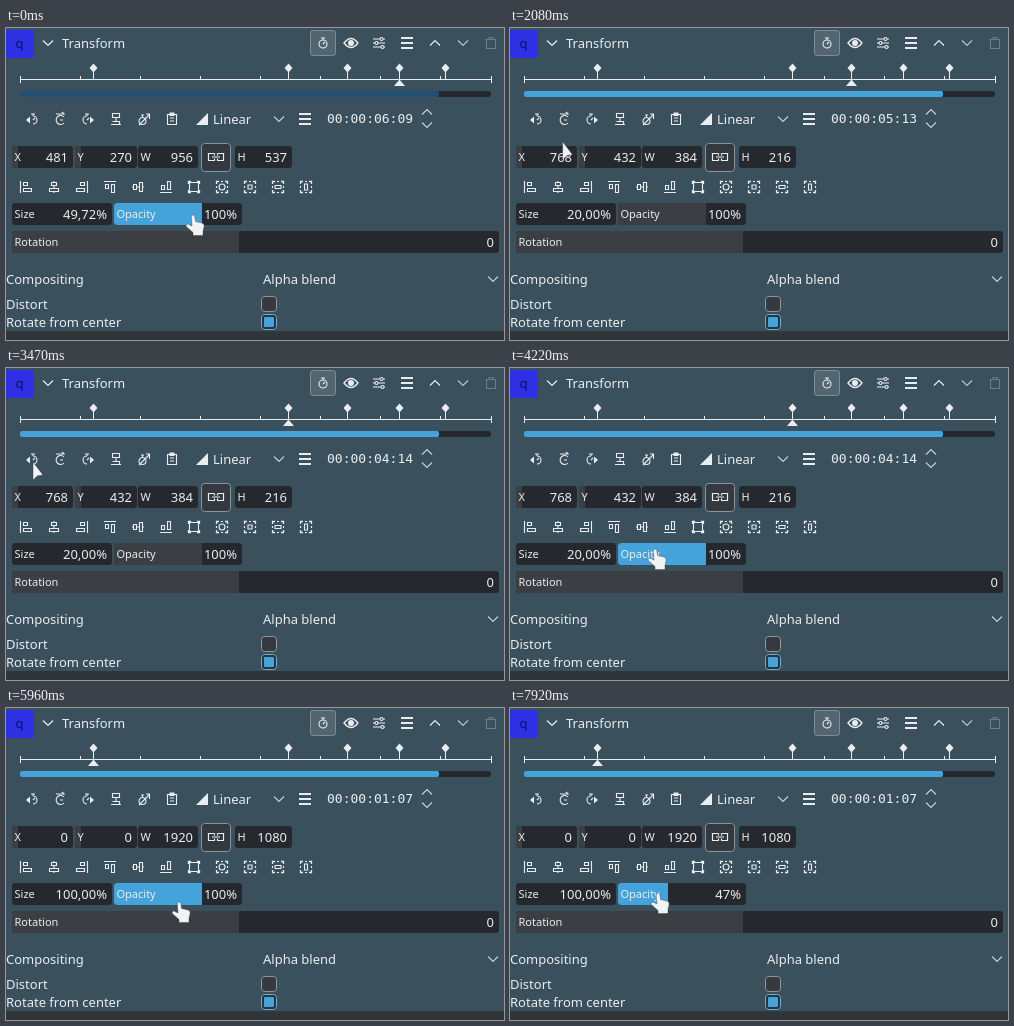
Animation, 498 px wide and 312 px high, one loop 7.99 s. Source, as an HTML page with a canvas:

```html
<!DOCTYPE html>
<html lang="en">
<head>
<meta charset="utf-8">
<title>Transform effect panel</title>
<style>
html, body { margin: 0; width: 100%; height: 100%; overflow: hidden; background: #3a505c; }
canvas { display: block; }
</style>
</head>
<body>
<canvas id="stage" width="498" height="312"></canvas>
<script>
const ctx = document.getElementById('stage').getContext('2d');
const LOOP = 7990;
const INK = '#e9edef', BLUE = '#43a3da', FIELD = '#25292d', FILL = '#3b3e42', PANEL = '#3a505c';
const SANS = '"Noto Sans", sans-serif', MONO = '"DejaVu Sans Mono", monospace';

const STATES = [
  { from: 0, x: 393, time: '00:00:06:09', values: ['481', '270', '956', '537', '49,72%'] },
  { from: 1800, x: 341, time: '00:00:05:13', values: ['768', '432', '384', '216', '20,00%'] },
  { from: 3330, x: 282, time: '00:00:04:14', values: ['768', '432', '384', '216', '20,00%'] },
  { from: 5060, x: 87, time: '00:00:01:07', values: ['0', '0', '1920', '1080', '100,00%'] }
];
const DRAG_START = 6970, PRESS_TIME = 140;

// Pointer path: time, x, y
const PATH = [
  [0, 187, 187], [130, 187, 187], [500, 178, 189], [890, 170, 186], [1100, 170, 186],
  [1380, 60, 100], [1590, 27, 94], [1940, 27, 94], [2250, 100, 150], [2640, 146, 184],
  [2770, 146, 184], [2910, 112, 168], [3190, 27, 94], [3470, 27, 94], [3960, 145, 181],
  [4220, 145, 181], [4780, 29, 95], [4920, 27, 94], [5130, 27, 94], [5540, 130, 172],
  [5820, 180, 193], [5960, 173, 194], [6310, 187, 188], [6970, 187, 188],
  [7380, 137, 186], [7720, 146, 185], [7850, 146, 185], [7920, 148, 185], [7990, 148, 185]
];

const clamp = (v, lo, hi) => Math.min(hi, Math.max(lo, v));

function slope(i, axis) {
  const a = PATH[i - 1], p = PATH[i], b = PATH[i + 1];
  const resting = q => !q || (q[1] === p[1] && q[2] === p[2]);
  return resting(a) || resting(b) ? 0 : (b[axis] - a[axis]) / (b[0] - a[0]);
}

function pointerAt(t) {
  let i = 0;
  while (i < PATH.length - 2 && t >= PATH[i + 1][0]) i++;
  const a = PATH[i], b = PATH[i + 1], span = b[0] - a[0];
  const u = (t - a[0]) / span, v = 1 - u;
  const along = k => v * v * (1 + 2 * u) * a[k] + u * u * (3 - 2 * u) * b[k]
    + span * u * v * (v * slope(i, k) - u * slope(i + 1, k));
  return { x: along(1), y: along(2) };
}

function text(s, x, y, size = 13, align = 'left', color = INK, family = SANS) {
  ctx.font = `${size}px ${family}`;
  ctx.textAlign = align;
  ctx.fillStyle = color;
  ctx.fillText(s, x, y);
}

function box(x, y, w, h, color, r = 0, border) {
  ctx.beginPath();
  ctx.roundRect(x, y, w, h, r);
  ctx.fillStyle = color;
  ctx.fill();
  if (border) {
    ctx.beginPath();
    ctx.roundRect(x + .5, y + .5, w - 1, h - 1, r);
    ctx.strokeStyle = border;
    ctx.lineWidth = 1;
    ctx.stroke();
  }
}

function shape(d, x, y, { fill, stroke, width = 1 }) {
  const path = new Path2D(d);
  ctx.save();
  ctx.translate(x, y);
  if (fill) { ctx.fillStyle = fill; ctx.fill(path); }
  if (stroke) { ctx.strokeStyle = stroke; ctx.lineWidth = width; ctx.stroke(path); }
  ctx.restore();
}

const line = (d, x, y, color = INK, width = 1.1) => shape(d, x, y, { stroke: color, width });
const solid = (d, x, y, color = INK) => shape(d, x, y, { fill: color });

const WATCH = 'M4 1A4 4 0 1 1-4 1A4 4 0 1 1 4 1M-2-5H2M0-5V-3M0 1L2-1';
const MENU = 'M-6-5H6M-6 0H6M-6 5H6';
const DOWN = 'M-5-2.5L0 2.5L5-2.5', UP = 'M-5 2.5L0-2.5L5 2.5';
const FRAME = 'M-4.5-4.5H4.5V4.5H-4.5Z';
const CORNERS = 'M-5.5-3V-5.5H-3M3-5.5H5.5V-3M5.5 3V5.5H3M-3 5.5H-5.5V3';

function field(label, x, y, w, value, fillTo, fillColor = FILL) {
  box(x, y, w, 22, FIELD, 3);
  if (fillTo > x) box(x, y, fillTo - x, 22, fillColor, [3, 0, 0, 3]);
  text(label, x + 2.5, y + 15, 11);
  text(value, x + w - 5, y + 16, 13, 'right');
}

function header() {
  box(0, 2, 28, 28, '#2e30e6');
  text('q', 13.5, 20, 13, 'center', '#11114e');
  line(DOWN, 42, 15, INK, 1.2);
  text('Transform', 56, 20);
  box(304, 2, 26, 26, '#53656f', 3, '#7e8b92');
  line(WATCH, 317, 15);
  line('M-7 0Q0-9 7 0Q0 9-7 0Z', 345, 15, INK, 1.3);
  solid('M3 0A3 3 0 1 1-3 0A3 3 0 1 1 3 0', 345, 15);
  line('M-6-4H1M4-4H6M-6 0H-4M-1 0H6M-6 4H2M5 4H6', 373, 15);
  line('M1-4a1.5 1.5 0 1 0 3 0a1.5 1.5 0 1 0-3 0M-4 0a1.5 1.5 0 1 0 3 0a1.5 1.5 0 1 0-3 0M2 4a1.5 1.5 0 1 0 3 0a1.5 1.5 0 1 0-3 0', 373, 15);
  line(MENU, 401, 15, INK, 2);
  line(UP, 429, 15, INK, 1.2);
  line(DOWN, 457, 15, '#b9c3c8', 1.2);
  line('M-5.5-3.5H5.5M-2-3.5V-5.5H2V-3.5M-4.5-3.5V5.5H4.5V-3.5', 485, 15, '#6d7d86');
}

function timeline(current, lit) {
  line('M14 51.5H486M14.5 48V55M485.5 48V55', 0, 0, INK, 1);
  for (let i = 1; i < 8; i++) line('M.5-3V1', Math.round(13.5 + i * 60.1), 51, INK, 1);
  for (const x of [87, 282, 341, 393, 439]) {
    line('M.5-9V1', x, 51, INK, 1);
    solid('M0-4.5L4 0L0 4.5L-4 0Z', x + .5, 40);
  }
  solid('M0 0L5.5 6.5H-5.5Z', current + .5, 51.5);
  box(14, 63, 471, 6, FIELD, 2);
  box(14, 63, 419, 6, '#235072', 2);
  if (lit > 0) {
    ctx.globalAlpha = lit;
    box(14, 63, 419, 6, BLUE, 2);
    ctx.globalAlpha = 1;
  }
}

function toolbar(time, pressed) {
  const y = 91;
  if (pressed) box(13, 78, 26, 26, BLUE, 3);
  const half = 'M1-3A4 4 0 1 1 1 5M1-5V-3M-1-5H3M1 1L3-1';
  line(half, 26, y);
  solid('M-2-2.5V4.5L-6 1Z', 26, y);
  line('M4-2A4.5 4.5 0 1 0 4 4M-4-5H4L2-7M0 1H3', 54, y);
  line('M-1-3A4 4 0 1 0-1 5M-1-5V-3M-3-5H1M-1 1L1-1', 82, y);
  solid('M2-2.5V4.5L6 1Z', 82, y);
  line('M-3.5-5.5H3.5V-1.5H-3.5ZM0-1.5V2M-5 5.5H5M-3.5 2.5H3.5V5.5', 110, y);
  line('M2 2A3.5 3.5 0 1 1-5 2A3.5 3.5 0 1 1 2 2M-3-4H0M-1.5-4V-2M-5 6L5-4M2-5H5.5V0', 138, y);
  line('M-4.5-4.5H4.5V5.5H-4.5ZM-2-1H2M-2 2H2', 166, y);
  solid('M-2.5-6.5H2.5V-3H-2.5Z', 166, y);
  solid('M-6 6H6V-6Z', 196, y);
  text('Linear', 207, 96);
  line(DOWN, 273, y, '#c9d1d5');
  line(MENU, 299, y, INK, 2);
  text(time, 321, 95, 13, 'left', INK, MONO);
  line(UP, 421, 84, '#c9d1d5');
  line(DOWN, 421, 97, '#c9d1d5');
}

function geometry(values) {
  field('X', 6, 118, 61, values[0], 12);
  field('Y', 69, 118, 62, values[1], 75);
  field('W', 132, 118, 60, values[2]);
  field('H', 229, 118, 57, values[3]);
  box(195, 115, 30, 29, '#33393e', 3, '#8c979d');
  line('M-1.5-3.5H-7.5V3.5H-1.5V1.5M-1.5-3.5V-1.5M1.5-3.5H7.5V3.5H1.5V1.5M1.5-3.5V-1.5M-4 0H4', 210, 129, INK, 1.2);
}

function alignRow() {
  const edge = 'M-5.5-6V6M-2.5-4.5H1.5V-1.5H-2.5ZM-2.5 1.5H5.5V4.5H-2.5Z';
  const middle = 'M0-6V-4.5M0-1.5V1.5M0 4.5V6M-2.5-4.5H2.5V-1.5H-2.5ZM-4.5 1.5H4.5V4.5H-4.5Z';
  const turned = [[edge, 1, 0, 0, 1], [middle, 1, 0, 0, 1], [edge, -1, 0, 0, 1],
    [edge, 0, 1, 1, 0], [middle, 0, 1, 1, 0], [edge, 0, -1, 1, 0]];
  turned.forEach(([d, a, b, c, e], i) => {
    ctx.save();
    ctx.transform(a, b, c, e, 20 + 28 * i, 159);
    line(d, 0, 0);
    ctx.restore();
  });
  const centers = ['M-3.5-3.5H3.5V3.5H-3.5Z', 'M3 0A3 3 0 1 1-3 0A3 3 0 1 1 3 0',
    'M-2-2H2V2H-2Z', 'M-3-1.5H3V1.5H-3Z', 'M-1.5-3H1.5V3H-1.5Z'];
  centers.forEach((d, i) => {
    const x = 188 + 28 * i;
    line(CORNERS, x, 159, INK, 1.3);
    if (i === 0) line(FRAME, x, 159);
    else {
      line(d, x, 159);
      line('M-1-5.5H1M-1 5.5H1M-5.5-1V1M5.5-1V1', x, 159);
    }
  });
}

function options() {
  text('Compositing', 0, 256);
  text('Alpha blend', 257, 256);
  line(DOWN, 487, 251, '#c9d1d5');
  text('Distort', 0, 281);
  text('Rotate from center', 0, 299);
  box(255, 268, 16, 16, '#363a3e', 3, '#929b9f');
  box(255, 286, 16, 16, '#2b343b', 3, '#69aed6');
  box(258, 289, 10, 10, BLUE, 1);
  box(0, 303, 498, 9, '#30353a');
}

function pointer({ x, y }, hand) {
  const d = hand
    ? 'M-1.8 1Q0-1.2 1.8 1L2.6 6.5L9 8Q11.5 8.8 11.2 11L10 16.5V20.5H0V17.5L-6.8 11.5Q-7.5 9-5 9L-1 11Z'
    : 'M0 0L10 13L4.5 13.8L0 18Z';
  shape(d, x, y, { fill: '#f2f3f3', stroke: 'rgba(40,48,54,.55)', width: .7 });
}

function draw(t) {
  const index = STATES.findLastIndex(s => t >= s.from);
  const state = STATES[index];
  const pos = pointerAt(t);
  const hover = pos.x >= 109 && pos.x <= 236 && pos.y >= 176 && pos.y <= 198;
  const opacity = t < DRAG_START ? 100 : clamp(47 + (pos.x - 148) * 53 / 38, 0, 100);

  box(0, 0, 498, 312, PANEL);
  header();
  timeline(state.x, clamp((t - STATES[1].from) / 150, 0, 1));
  toolbar(state.time, index > 0 && t < state.from + PRESS_TIME);
  geometry(state.values);
  alignRow();
  field('Size', 6, 175, 100, state.values[4]);
  field('Opacity', 108, 175, 128, Math.round(opacity) + '%', 158 + (opacity - 47) * 38 / 53, hover ? BLUE : FILL);
  field('Rotation', 6, 203, 487, '0', 233);
  options();
  pointer(pos, hover);
}

function tick(now) {
  draw(now % LOOP);
  requestAnimationFrame(tick);
}
requestAnimationFrame(tick);
</script>
</body>
</html>
```
